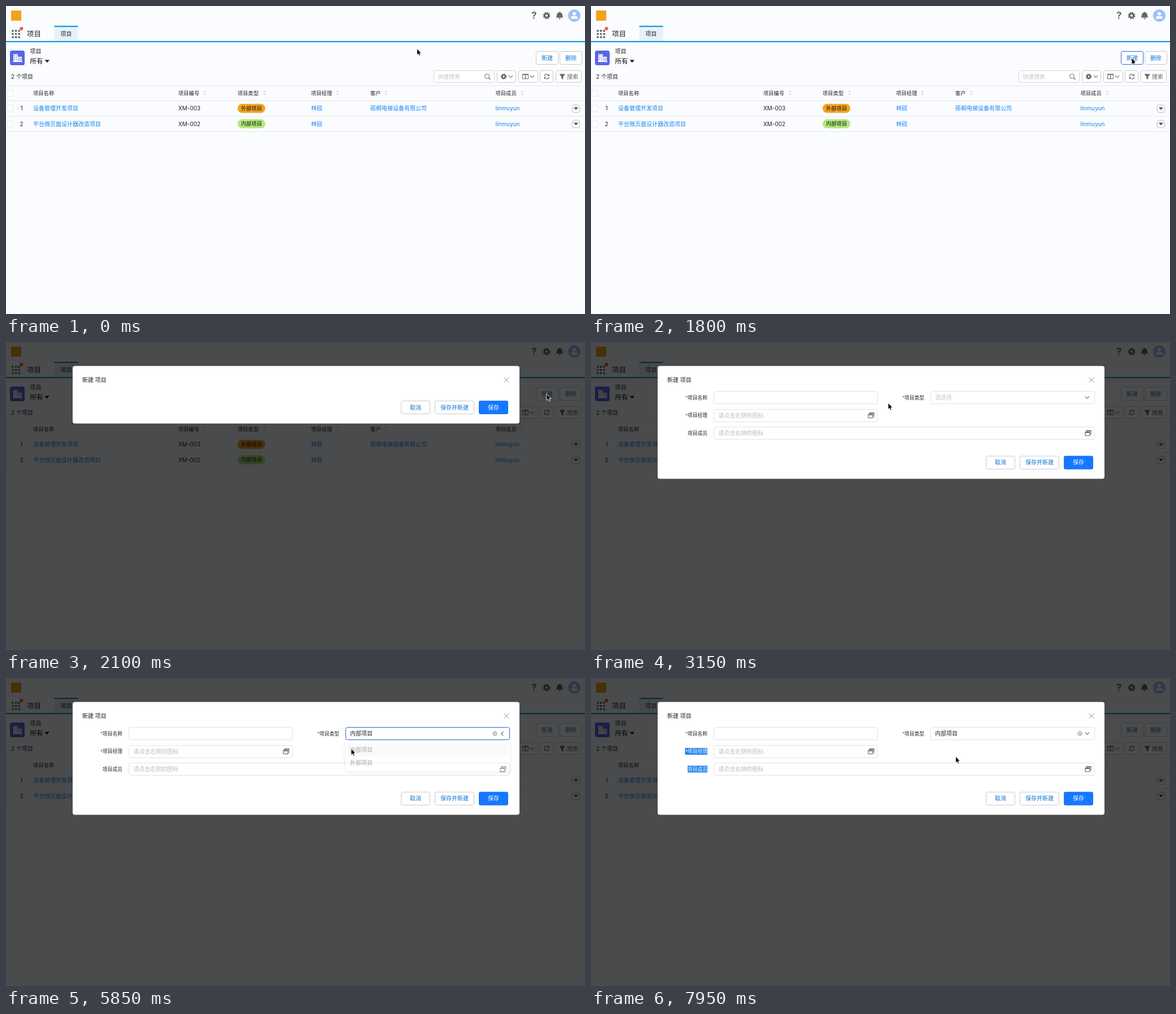
Write an HTML page that moves like this. It is 1025 by 546 pixels and loops after 8000 ms.

```html
<!DOCTYPE html>
<html lang="zh-CN">
<head>
<meta charset="utf-8">
<title>新建项目</title>
<style>
html, body { margin: 0; width: 100%; height: 100%; overflow: hidden; background: #fafcff; }
svg { display: block; width: 100%; height: 100%; }
text { font-family: Inter, "Noto Sans CJK SC", "Noto Sans CJK", sans-serif; white-space: pre; }
</style>
</head>
<body>
<svg id="stage" viewBox="0 0 1025 546"></svg>
<script>
const LINK = '#1b86ee', BLUE = '#0b76d6', INK = '#222', GRAY = '#666', EDGE = '#c9c9cd', SOFT = '#e2e2e6';
const FOCUS = '#3862d6', BRAND = '#0d9ddb';

// Text is placed by its left edge and vertical centre.
const text = (x, y, str, fill = INK, size = 10, more = '') =>
  `<text x="${x}" y="${y + size * .37}" font-size="${size}" fill="${fill}" ${more}>${str}</text>`;
const rect = (x, y, w, h, fill, more = '') =>
  `<rect x="${x}" y="${y}" width="${w}" height="${h}" fill="${fill}" ${more}/>`;
const box = (x, y, w, h, edge = EDGE, more = '') =>
  rect(x + .5, y + .5, w - 1, h - 1, '#fff', `rx="3" stroke="${edge}" ${more}`);
const circle = (x, y, r, fill, more = '') => `<circle cx="${x}" cy="${y}" r="${r}" fill="${fill}" ${more}/>`;
const fillPath = (d, fill) => `<path d="${d}" fill="${fill}"/>`;
const line = (d, color, width = 1, more = '') =>
  `<path d="${d}" fill="none" stroke="${color}" stroke-width="${width}" ${more}/>`;
const group = (body, more = '') => `<g ${more}>${body}</g>`;
const at = (x, y, body, scale = 1) => group(body, `transform="translate(${x} ${y}) scale(${scale})"`);
const bold = 'font-weight="500"';

const gear = (x, y, scale) => at(x, y,
  circle(0, 0, 3.6, 'none', `stroke="${GRAY}" stroke-width="3"`) +
  circle(0, 0, 5.5, 'none', `stroke="${GRAY}" stroke-width="2" stroke-dasharray="2.4 1.92"`), scale);
const chevron = (x, y, more = '') => at(x, y, line('M-3.5 -1.8L0 1.8L3.5 -1.8', GRAY, 1.1, more));
const windows = (x, y) => at(x, y,
  line('M-3 -2.5V-4.5H5V2H3', GRAY, 1.1) + rect(-5, -2, 8, 6.5, '#fff', `stroke="${GRAY}" stroke-width="1.1"`) +
  line('M-5 -1H3M-3 -4H5', GRAY, 1.4));

function header() {
  let s = rect(9, 8, 18, 18, '#f2a11d');
  s += text(930, 17, '?', GRAY, 17, 'font-weight="700"') + gear(957, 17, 1);
  s += fillPath('M973.5 20.5C975.5 18.5 974.5 15 976 13Q977 11.6 979 11.2A1 1 0 0 1 981 11.2Q983 11.6 984 13C985.500 15 984.5 18.5 986.5 20.5Z M978 21.500H982A2 2 0 0 1 978 21.5Z', GRAY);
  s += circle(1006, 17, 11, '#a0c0f8') + circle(1006, 13.8, 3, '#fff') +
    fillPath('M1000 22.500V21.5Q1000 18 1003.5 18H1008.5Q1012 18 1012 21.500V22.5Z', '#fff');
  for (let i = 0; i < 9; i++) s += circle(12 + i % 3 * 5.6, 44 + (i / 3 | 0) * 5.6, 1.9, GRAY);
  s += circle(27.3, 40, 3, '#ff4d4f') + text(37, 49.5, '项目', INK, 12.5);
  s += rect(85.5, 35, 42, 27, '#e8f1fa') + rect(85.5, 35, 42, 2.2, BRAND) + text(96.5, 49.5, '项目');
  return s + rect(0, 62, 1025, 2.2, BRAND);
}

function toolbar() {
  let s = rect(7, 79, 26, 26, '#5867e8', 'rx="3.5"');
  s += rect(13, 85.500, 8, 13, '#fff') + rect(21.5, 90, 6.5, 8.5, '#fff') + rect(12, 98, 17, 1.2, '#fff');
  for (const [x, y] of [[14.5, 87.5], [17.8, 87.5], [14.5, 90.8], [17.8, 90.8], [14.5, 94], [17.8, 94], [23, 92], [25.5, 92], [23, 95], [25.5, 95]])
    s += rect(x, y, 1.5, 1.6, '#5867e8');
  s += text(42.5, 80.5, '项目') + text(42.5, 97.5, '所有', '#111', 11.5, bold);
  s += fillPath('M68.5 95.500H77L72.75 100.5Z', '#222') + text(9, 125, '2 个项目');
  s += box(938, 80, 40, 24, EDGE, 'id="create"') + text(948, 92, '新建', BLUE);
  s += box(980, 80, 40, 24) + text(990, 92, '删除', BLUE);
  s += box(757, 114, 108, 22, '#d4d4d8') + text(764, 125, '快捷搜索', '#c6c6ca');
  s += circle(851.5, 124.5, 4, 'none', `stroke="${GRAY}"`) + line('M854.5 127.500L857.5 130.5', GRAY, 1.2);
  s += box(869, 114, 34, 22) + gear(881, 125, .8) + chevron(893.5, 125);
  s += box(907, 114, 35, 22) + rect(914.5, 121, 10, 8, 'none', `stroke="${GRAY}"`) +
    line('M914.5 121.500H924.5M919.5 121V129', GRAY, 1.3) + chevron(931.5, 125);
  s += box(945, 114, 24, 22) + line('M953 124A4.200 4.2 0 0 1 960.5 122.500M961.5 126A4.2 4.2 0 0 1 954 127.5', GRAY, 1.2) +
    fillPath('M961.8 120.500V124.200H958Z M952.700 129.500V125.800H956.5Z', GRAY);
  return s + box(973, 114, 46, 22) +
    fillPath('M979.5 120.500H990L986.200 125.500V130.500L983.3 128.500V125.5Z', GRAY) + text(993, 125, '搜索', GRAY);
}

function table() {
  let s = '';
  for (const y of [141.5, 168, 195.5, 222.5]) s += rect(0, y - .5, 1025, 1, '#e6e8ec');
  for (const y of [155, 181.5, 209]) s += box(1, y - 6, 12, 12, '#e6e7eb');
  const heads = [['项目名称', 48], ['项目编号', 305, 352], ['项目类型', 410, 457.5], ['项目经理', 540, 587], ['客户', 645, 673], ['项目成员', 866.5, 914]];
  for (const [name, x, sort] of heads) {
    s += text(x, 155, name, INK, 9.3, bold);
    if (sort) s += at(sort, 154, fillPath('M-2.500 -1.500L0 -4L2.5 -1.5Z M-2.500 1.500H2.5L0 4Z', '#ccced4'));
  }
  const rows = [
    ['设备管理开发项目', 'XM-003', '外部项目', '#f5a31d', '砾桐电梯设备有限公司'],
    ['平台微页面设计器改造项目', 'XM-002', '内部项目', '#b3e97b', '']
  ];
  rows.forEach(([name, code, kind, color, client], i) => {
    const y = 181.5 + i * 27.3;
    s += text(27.5, y, i + 1, INK, 10, 'text-anchor="middle"') + text(48, y, name, LINK) + text(305, y, code);
    s += rect(410, y - 8, 49, 16, color, 'rx="8"') + text(416, y, kind, '#111', 9.3);
    s += text(540, y, '林砚', LINK) + text(645, y, client, LINK) + text(866.5, y, 'linmuyun', LINK);
    s += box(1002, y - 6.5, 14, 14, '#b9b9bd') + at(1009, y, fillPath('M-4 -2H4L0 3Z', '#555'));
  });
  return s;
}

function label(x, y, str, id, star = true) {
  const mark = id ? rect(star ? x - 4.5 : x, y - 6, star ? 39.5 : 35, 12, '#1f82ee', `id="${id}Mark" display="none"`) : '';
  return mark + group((star ? text(x - 4, y + .5, '*', '#e5342b', 8.75, `id="${id}Star"`) : '') +
    text(x, y, str, INK, 8.75, bold), id ? `id="${id}Label"` : '');
}

function form() {
  const hint = '请点击右侧的图标', pale = '#bcbcc0';
  let s = label(171, 98.5, '项目名称') + box(217, 87, 291, 23, SOFT, 'id="name"');
  s += label(555, 98.5, '项目类型') + box(601, 87, 291, 23, SOFT, 'id="kind"');
  s += text(609, 98.5, '请选择', '#c6c6ca', 10, 'id="pick"');
  s += group(text(609, 98.5, '内部项目') + circle(865.5, 98.5, 4.3, '#bfbfc3') +
    line('M863.800 96.800L867.200 100.200M867.200 96.800L863.8 100.2', '#fff', 1), 'id="picked"');
  s += chevron(878.5, 98.5, 'id="arrow"');
  s += label(171, 130, '项目经理', 'boss') + box(217, 119, 291, 23, SOFT, 'id="manager"') + text(225.5, 130, hint, pale) + windows(496, 130);
  s += label(171, 161.5, '项目成员', 'team', false) + box(217, 150, 675, 23, SOFT) + text(225.5, 161.5, hint, pale) + windows(880, 161.5);
  s += group(rect(601, 113, 291, 52, '#fff', 'rx="3" style="filter:drop-shadow(0 2px 4px #0003)"') +
    rect(603.5, 116, 286, 22, '#f3f4f6', 'rx="2" id="hover"') +
    text(609, 127.5, '内部项目') + text(609, 150.5, '外部项目'), 'id="menu"');
  return group(s, 'id="form"');
}

function modal() {
  const footer = box(699, 104, 52, 24) + text(715, 116, '取消', BLUE) + box(759, 104, 70, 24) +
    text(769, 116, '保存并新建', BLUE) + rect(837, 104, 52, 24, '#1677ff', 'rx="3"') + text(853, 116, '保存', '#fff');
  return group(rect(118, 42.5, 791, 102, '#fff', 'rx="4" id="sheet"') + text(135, 67.5, '新建 项目', INK, 10, bold) +
    line('M881.500 62.500L890.500 71.500M890.500 62.500L881.5 71.5', '#999') + form() + group(footer, 'id="footer"'), 'id="modal"');
}

document.getElementById('stage').innerHTML =
  rect(0, 0, 1025, 546, '#fafcff') + header() + toolbar() + table() +
  rect(0, 0, 1025, 546, '#000', 'id="mask"') + modal() +
  `<path id="cursor" d="M0 0V11.500L2.600 9.200L4.300 13L6.300 12.100L4.600 8.400H8Z" fill="#000" stroke="#fff" stroke-width=".9"/>`;

const $ = id => document.getElementById(id);
const set = (id, attr, value) => $(id).setAttribute(attr, value);
const show = (id, on) => set(id, 'display', on ? 'inline' : 'none');
const focus = (id, on, idle = SOFT) => set(id, 'stroke', on ? FOCUS : idle);

// Pointer stops: time, x, y
const stops = [
  [0, 727.5, 75.5], [750, 727.5, 75.5], [1650, 950, 99], [1800, 957, 92], [2550, 957, 92], [3150, 526, 108],
  [3300, 541, 111], [3450, 541, 111], [3900, 400, 99], [4050, 400, 99], [4500, 670.5, 95], [4800, 670.5, 95],
  [5550, 635, 125], [5700, 635, 125], [6750, 202, 128], [6900, 185.5, 127.5], [7050, 159, 126], [7200, 165, 127],
  [7650, 480, 148], [7800, 605.5, 139.5], [7950, 645.5, 139]
];

function pointer(t) {
  const i = stops.findIndex(s => s[0] >= t);
  if (i < 1) return stops[0].slice(1);
  const [t0, x0, y0] = stops[i - 1], [t1, x1, y1] = stops[i];
  const k = (t - t0) / (t1 - t0), e = k * k * (3 - 2 * k);
  return [x0 + (x1 - x0) * e, y0 + (y1 - y0) * e];
}

function draw(now) {
  const t = Math.floor(now % 8000 / 150) * 150;
  const within = (a, b) => t >= a && t < b;
  const opening = t < 2100, filled = t >= 2400, chosen = t >= 5850;

  focus('create', within(1800, 2100), EDGE);
  show('mask', t >= 1950);
  set('mask', 'opacity', opening ? .38 : .7);
  show('modal', t >= 1950);
  set('modal', 'opacity', opening ? .84 : 1);
  set('modal', 'transform', opening ? 'translate(513.5 -176) scale(.899) translate(-513.5 176)' : '');
  set('sheet', 'height', filled ? 200 : 102);
  set('footer', 'transform', `translate(0 ${filled ? 97.7 : 0})`);
  show('form', filled);

  focus('name', within(3750, 4500));
  focus('kind', within(4500, 6600));
  focus('manager', within(6600, 7200));
  show('menu', within(4800, 6000));
  set('menu', 'opacity', chosen ? .4 : 1);
  show('hover', t >= 5250);
  show('pick', !chosen);
  show('picked', chosen);
  set('arrow', 'transform', `rotate(${t === 4800 || t === 5850 ? 90 : within(4950, 5850) ? 180 : 0})`);

  for (const [id, from] of [['boss', 7200], ['team', 7500]]) {
    const on = t >= from;
    show(id + 'Mark', on);
    for (const el of $(id + 'Label').children) el.setAttribute('fill', on ? '#fff' : el.id ? '#e5342b' : INK);
  }
  set('cursor', 'transform', `translate(${pointer(t)})`);
}

let start;
function tick(now) {
  start ??= now;
  draw(now - start);
  requestAnimationFrame(tick);
}
draw(0);
requestAnimationFrame(tick);
</script>
</body>
</html>
```
